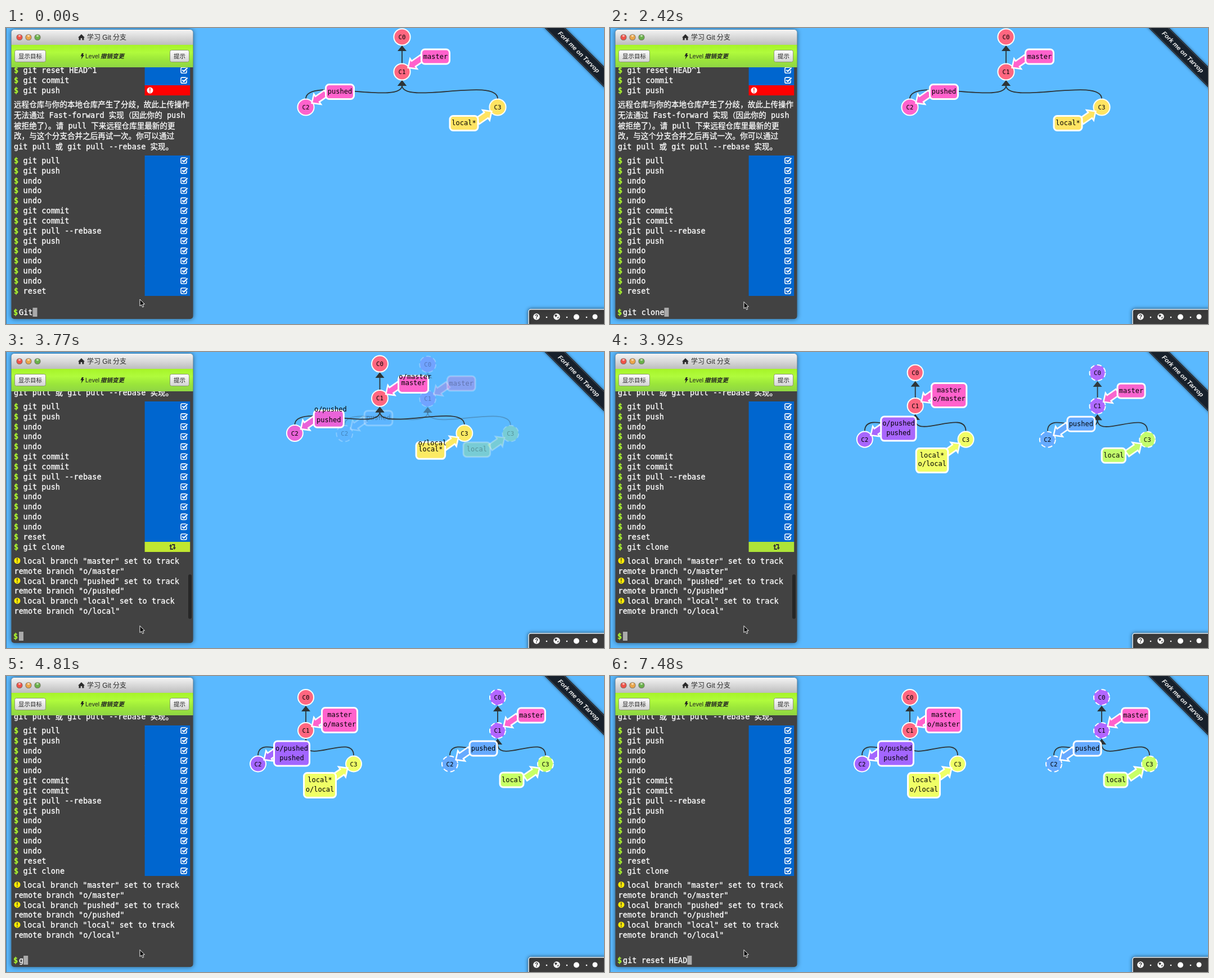
Write an HTML page with a canvas that moves like this. It is 1063 px wide and 527 px high and loops after 8000 ms.

```html
<!DOCTYPE html>
<html lang="zh-CN">
<head>
<meta charset="utf-8">
<title>学习 Git 分支</title>
<style>
html, body { margin: 0; width: 100%; height: 100%; overflow: hidden; background: #5ab9ff; }
canvas { display: block; }
</style>
</head>
<body>
<canvas id="stage" width="1063" height="527"></canvas>
<script>
const ctx = document.getElementById('stage').getContext('2d');
// Keeps full-width punctuation at full width.
ctx.fontKerning = 'none';
ctx.letterSpacing = '0.01px';

const LOOP = 8000;
const MONO = '"DejaVu Sans Mono", "Noto Sans CJK SC", monospace';
const SANS = '"Liberation Sans", "Noto Sans CJK SC", sans-serif';
const TERM_FONT = '13.57px ' + MONO;
const CHAR_W = 8.17, ROW_H = 17.85;

const mix = (a, b, p) => a + (b - a) * p;
const mixAll = (a, b, p) => a.map((v, i) => mix(v, b[i], p));
const rgb = c => `rgb(${c.map(Math.round).join()})`;
const clamp = v => Math.max(0, Math.min(1, v));
const ease = v => v < .5 ? 4 * v ** 3 : 1 - 4 * (1 - v) ** 3;
// Last entry of [time, value] pairs whose time has come.
const at = (keys, t) => keys.filter(k => k[0] <= t).pop()[1];

function text(str, x, y, font, color, align = 'left') {
  ctx.font = font;
  ctx.fillStyle = color;
  ctx.textAlign = align;
  ctx.fillText(str, x, y);
}
// Terminal text is slightly heavier than the plain face.
function termText(str, x, y, color = '#fff', weight = '') {
  text(str, x, y, weight + TERM_FONT, color);
  ctx.strokeStyle = color;
  ctx.lineWidth = .3;
  ctx.strokeText(str, x, y);
}
function box(x, y, w, h, r, fill, stroke, lineWidth = 1) {
  ctx.beginPath();
  ctx.roundRect(x, y, w, h, r);
  if (fill) { ctx.fillStyle = fill; ctx.fill(); }
  if (stroke) { ctx.strokeStyle = stroke; ctx.lineWidth = lineWidth; ctx.stroke(); }
}
function disc(x, y, r, fill) {
  ctx.beginPath();
  ctx.arc(x, y, r, 0, 7);
  ctx.fillStyle = fill;
  ctx.fill();
}
function shape(points, fill, stroke, lineWidth, closed = true) {
  ctx.beginPath();
  points.forEach(p => ctx.lineTo(...p));
  if (closed) ctx.closePath();
  if (fill) { ctx.fillStyle = fill; ctx.fill(); }
  if (stroke) { ctx.strokeStyle = stroke; ctx.lineWidth = lineWidth; ctx.stroke(); }
}
function vertical(y0, y1, ...colors) {
  const g = ctx.createLinearGradient(0, y0, 0, y1);
  colors.forEach((c, i) => g.addColorStop(i / (colors.length - 1), c));
  return g;
}
function shadowed(blur, draw) {
  ctx.save();
  ctx.shadowColor = 'rgba(0,0,0,.55)';
  ctx.shadowBlur = blur;
  draw();
  ctx.restore();
}
function placed(x, y, draw, angle = 0) {
  ctx.save();
  ctx.translate(x, y);
  ctx.rotate(angle);
  draw();
  ctx.restore();
}

// ---- commit trees ----
const PINK = [255, 98, 204], RED = [255, 102, 128], YELLOW = [255, 228, 98],
      PURPLE = [163, 102, 255], VIOLET = [178, 102, 255], LEMON = [240, 255, 102],
      SKY = [102, 170, 255], LIME = [200, 255, 102];
const REMOTE_DX = 341;
const COMMITS = [
  { name: 'C0', from: [704, 16], to: [533, 38], colors: [RED, RED, VIOLET] },
  { name: 'C1', from: [704, 78], to: [533, 97], colors: [RED, RED, VIOLET] },
  { name: 'C2', from: [533, 141], to: [448, 156.5], colors: [PINK, PURPLE, SKY] },
  { name: 'C3', from: [874, 141], to: [618, 156.5], colors: [YELLOW, LEMON, LIME] }
];
// Boxes are [centre x, centre y, width, height].
const BRANCHES = [
  { name: 'master', commit: 1, side: 1, rise: -1, colors: [PINK, PINK, PINK],
    from: [763.5, 51, 50, 26], to: [593, 78.5, 63, 44], remote: [934, 70, 49, 26] },
  { name: 'pushed', commit: 2, side: 1, rise: -1, trackFirst: true, colors: [PINK, PURPLE, SKY],
    from: [593.5, 113.5, 50, 26], to: [508, 138, 63, 44], remote: [848.5, 129, 49, 26] },
  { name: 'local', mark: '*', commit: 3, side: -1, rise: 1, colors: [YELLOW, LEMON, LIME],
    from: [814, 169.5, 50, 26], to: [558, 194.5, 57, 44], remote: [899, 185, 42, 26] }
];
const DARK = '#2d3436';

function edge(child, parent) {
  const [x0, y0] = child, [x1, y1] = parent;
  ctx.beginPath();
  ctx.moveTo(x0, y0 - 15);
  if (x0 === x1) ctx.lineTo(x1, y1 + 22);
  else ctx.bezierCurveTo(x0, y0 - 55, x1, y1 + 60, x1, y1 + 24);
  ctx.strokeStyle = DARK;
  ctx.lineWidth = 1.8;
  ctx.stroke();
  shape([[x1, y1 + 15], [x1 + 8, y1 + 25], [x1 - 8, y1 + 25]], DARK);
}
function pointer([x, y], side, rise, fill) {
  const angle = Math.atan2(rise * .57, side * .82);
  placed(x, y, () => shape(
    [[13, 0], [25, -11], [25, -6], [44, -6], [44, 6], [25, 6], [25, 11]],
    fill, '#fff', 2.6), angle);
}
function tree(p, remote, tracking) {
  const labelFont = '12px ' + MONO;
  const spots = COMMITS.map(c =>
    mixAll(c.from, remote ? [c.to[0] + REMOTE_DX, c.to[1]] : c.to, p));
  const paint = c => rgb(remote ? c[2] : mixAll(c[0], c[1], p));

  [[1, 0], [2, 1], [3, 1]].forEach(([a, b]) => edge(spots[a], spots[b]));
  COMMITS.forEach((c, i) => {
    const [x, y] = spots[i];
    disc(x, y, 14, paint(c.colors));
    ctx.strokeStyle = '#fff';
    ctx.lineWidth = 2;
    ctx.setLineDash(remote ? [8, 5] : []);
    ctx.beginPath();
    ctx.arc(x, y, mix(14.6, 14, p), 0, 2 * Math.PI);
    ctx.stroke();
    ctx.setLineDash([]);
    text(c.name, x, y + 4, '10.8px ' + MONO, '#000', 'center');
  });
  BRANCHES.forEach(b => {
    const area = mixAll(b.from, remote ? b.remote : b.to, p), fill = paint(b.colors);
    const [cx, cy, w, h] = area;
    pointer(spots[b.commit], b.side, b.rise, fill);
    box(cx - w / 2, cy - h / 2, w, h, 6, fill, '#fff', 3);
    if (remote) return text(b.name, cx, cy + 3.5, labelFont, '#000', 'center');
    const first = b.to[1] - 9, second = b.to[1] + 8;
    const nameY = mix(b.from[1], b.trackFirst ? second : first, p);
    text(b.name + (b.mark || ''), cx, nameY + 3.5, labelFont, '#000', 'center');
    if (tracking) {
      const x = mix(b.from[0] + 4, b.to[0], p);
      const y = mix(b.from[1] - 18.5, b.trackFirst ? first : second, p);
      text('o/' + b.name, x, y + 3.5, labelFont, '#000', 'center');
    }
  });
}
function trees(t) {
  const elapsed = Math.floor((t - 3620) / 148.6) * 148.6;
  const progress = lead => ease(clamp((elapsed + lead) / 400));
  const tracking = t >= 3620;
  if (tracking) {
    const p = progress(14);
    ctx.globalAlpha = p;
    tree(p, true);
    ctx.globalAlpha = 1;
  }
  tree(tracking ? progress(6) : 0, false, tracking);
}

// ---- terminal ----
const before = ['git reset HEAD^1', 'git commit', 'git push'];
const after = ['git pull', 'git push', 'undo', 'undo', 'undo', 'git commit', 'git commit',
  'git pull --rebase', 'git push', 'undo', 'undo', 'undo', 'undo', 'reset', 'git clone'];
const paragraph = [
  '远程仓库与你的本地仓库产生了分歧，故此上传操作',
  '无法通过 Fast-forward 实现（因此你的 push',
  '被拒绝了）。请 pull 下来远程仓库里最新的更',
  '改，与这个分支合并之后再试一次。你可以通过',
  'git pull 或 git pull --rebase 实现。'
];
const prefixes = (str, ...keys) => keys.map(([time, n]) => [time, str.slice(0, n)]);
const TYPING = [
  ...prefixes('Git', [0, 3], [150, 2], [310, 1], [470, 0]),
  ...prefixes('git clone', [770, 1], [920, 2], [1070, 3], [1220, 4],
    [1670, 5], [1820, 6], [1970, 7], [2120, 8], [2270, 9], [3170, 0]),
  ...prefixes('git reset HEAD', [4810, 1], [4960, 3], [5540, 5], [5690, 6], [5990, 7],
    [6140, 8], [6440, 9], [6580, 10], [6880, 12], [7180, 13], [7480, 14])
];
const SCROLL = [[0, 0], [3170, 18], [3620, 139]];
const BLUE = [0, 102, 207], BLUE_CSS = rgb(BLUE), GREEN = '#a9f32f';
const STATUS = [[3170, [234, 234, 36]], [3620, [222, 233, 38]], [3770, [192, 231, 48]],
  [3920, [174, 228, 56]], [4070, [156, 224, 66]], [4370, [100, 175, 120]],
  [4510, [35, 125, 185]], [4660, BLUE]];

function checkIcon(x, y) {
  const tick = [[x - 3.5, y - .5], [x - 1, y + 2], [x + 5.5, y - 4.5]];
  box(x - 6, y - 5, 10, 10, 2, null, '#fff', 1.6);
  shape(tick, null, BLUE_CSS, 4, false);
  shape(tick, null, '#fff', 2.2, false);
}
function alertIcon(x, y, fill, mark) {
  disc(x, y, 5.5, fill);
  text('!', x, y + 3.7, 'bold 10px ' + SANS, mark, 'center');
}
function swapIcon(x, y) {
  const ink = '#333';
  shape([[x - 6, y - 1], [x - 3.3, y - 5], [x - .6, y - 1]], ink);
  shape([[x - 3.3, y - 2], [x - 3.3, y + 4], [x + 1, y + 4]], null, ink, 2, false);
  shape([[x + .6, y + 1], [x + 3.3, y + 5], [x + 6, y + 1]], ink);
  shape([[x + 3.3, y + 2], [x + 3.3, y - 4], [x - 1, y - 4]], null, ink, 2, false);
}
function command(str, y, status, icon) {
  ctx.fillStyle = status;
  ctx.fillRect(246.6, Math.round(y - 9), 80.6, 18);
  termText('$', 14, y + 4.8, GREEN, 'bold ');
  termText(str, 30.6, y + 4.8);
  icon(y);
}
function log(t) {
  const check = y => checkIcon(317, y);
  ctx.save();
  ctx.beginPath();
  ctx.rect(9, 70, 323, 407);
  ctx.clip();
  ctx.translate(0, -at(SCROLL, t));

  before.forEach((str, i) => {
    const failed = i === 2;
    command(str, 75.3 + i * ROW_H, failed ? '#f00' : BLUE_CSS,
      failed ? y => alertIcon(256, y, '#fff', '#f00') : check);
  });
  paragraph.forEach((str, i) => termText(str, 14, 141 + i * 18.75));
  after.forEach((str, i) => {
    const y = 236 + i * ROW_H, cloning = str === 'git clone';
    if (cloning && t < 3170) return;
    const icon = !cloning || t >= 4810 ? check
      : t >= 3620 ? y => swapIcon(296, y)
      : y => box(269.5, y - 4.5, 10, 9, 2, null, '#333', 1.6);
    command(str, y, cloning ? rgb(at(STATUS, t)) : BLUE_CSS, icon);
  });
  if (t >= 3620) ['master', 'pushed', 'local'].forEach((name, i) => {
    const y = 511 + i * 2 * ROW_H;
    alertIcon(20, y - .5, '#ffeb00', '#333');
    termText(`local branch "${name}" set to track`, 30, y + 4.8);
    termText(`remote branch "o/${name}"`, 14.5, y + ROW_H + 4.8);
  });
  ctx.restore();

  const barAlpha = t < 3170 ? 0 : clamp((4660 - t) / 400);
  const barTop = t < 3620 ? 391 : 396;
  box(324, barTop, 6, 475 - barTop, 3, `rgba(20,20,20,${.6 * barAlpha})`);
}
function button(label, x, w) {
  box(x + .5, 39.5, w, 21, 3, vertical(39, 61, '#fff', '#d2d2d2'), '#8c9a70');
  text(label, x + .5 + w / 2, 54, '10.5px ' + SANS, '#222', 'center');
}
function terminal(t) {
  shadowed(9, () => box(9.5, 3, 323, 515, 5, '#424242'));
  box(9.5, 3, 323, 27, [5, 5, 0, 0], vertical(3, 30, '#f4f4f4', '#bdbdbd'));
  ['#ee5248', '#e9a54a', '#69b04a'].forEach((color, i) => {
    const x = 24 + 16 * i;
    disc(x, 16.5, 5.6, 'rgba(60,50,40,.65)');
    disc(x, 16.5, 4.8, color);
    disc(x, 14, 2, 'rgba(255,255,255,.55)');
  });
  shape([[128, 17], [134, 11], [140, 17], [138.5, 17], [138.5, 21.5], [135.3, 21.5],
    [135.3, 18], [132.7, 18], [132.7, 21.5], [129.5, 21.5], [129.5, 17]], '#2b2b2b');
  text('学习 Git 分支', 144, 20.5, '12px ' + SANS, '#2b2b2b');

  ctx.fillStyle = vertical(30, 70, '#a6f427', '#b0fb3c', '#9be63a', '#8fd644');
  ctx.fillRect(9.5, 30, 323, 40);
  button('显示目标', 15, 55);
  button('提示', 291, 34);
  shape([[135, 45], [138, 45], [136.5, 48], [139, 48], [133.5, 56], [135, 50], [132.5, 50.5]], '#222');
  text('Level', 141, 53.5, '10.5px ' + SANS, '#222');
  text('撤销变更', 168, 53.5, 'italic bold 10.5px ' + SANS, '#222');

  log(t);
  const typed = at(TYPING, t);
  termText('$', 13, 511, GREEN, 'bold ');
  termText(typed, 23, 511);
  ctx.fillStyle = '#aaa';
  ctx.fillRect(23 + typed.length * CHAR_W, 498, 8, 16);
}

// ---- page furniture ----
function ribbon() {
  placed(1018.5, 42.5, () => {
    shadowed(5, () => box(-100, -13, 200, 26, 0, '#17202b'));
    [-11.5, 11.5].forEach(y =>
      shape([[-100, y], [100, y]], null, 'rgba(255,255,255,.2)', 1, false));
    text('Fork me on Tarvop', 0, 4, 'italic bold 11px ' + SANS, '#f0f0f0', 'center');
  }, Math.PI / 4);
}
function footer() {
  shadowed(6, () => box(929, 501, 150, 40, [4, 0, 0, 0], '#3b3b3b', '#e8eef2', 1.5));
  disc(943, 514, 5.8, '#fff');
  text('?', 943, 517.8, 'bold 10px ' + SANS, '#333', 'center');
  disc(979, 514, 5.8, '#fff');
  shape([[975, 511], [978, 510], [980, 512], [977, 515]], '#3b3b3b');
  shape([[980, 515], [983, 514], [981, 518]], '#3b3b3b');
  disc(1014, 514.5, 5, '#fff');
  disc(1047, 514, 4.5, '#fff');
  [961, 997, 1032].forEach(x => disc(x, 515, 1.3, '#fff'));
}
function mouse(t) {
  placed(238, t < 2420 ? 483 : 487.5, () => shape(
    [[0, 0], [0, 12], [2.8, 9.6], [4.8, 14], [6.8, 13], [4.9, 8.9], [8.4, 8.6]],
    '#000', '#fff', 1));
}

function render(t) {
  ctx.fillStyle = '#5ab9ff';
  ctx.fillRect(0, 0, 1063, 527);
  ctx.fillStyle = 'rgba(40,70,100,.6)';
  ctx.fillRect(0, 0, 1, 527);
  trees(t);
  terminal(t);
  ribbon();
  footer();
  mouse(t);
}
function tick() {
  render(performance.now() % LOOP);
  requestAnimationFrame(tick);
}
tick();
</script>
</body>
</html>
```
